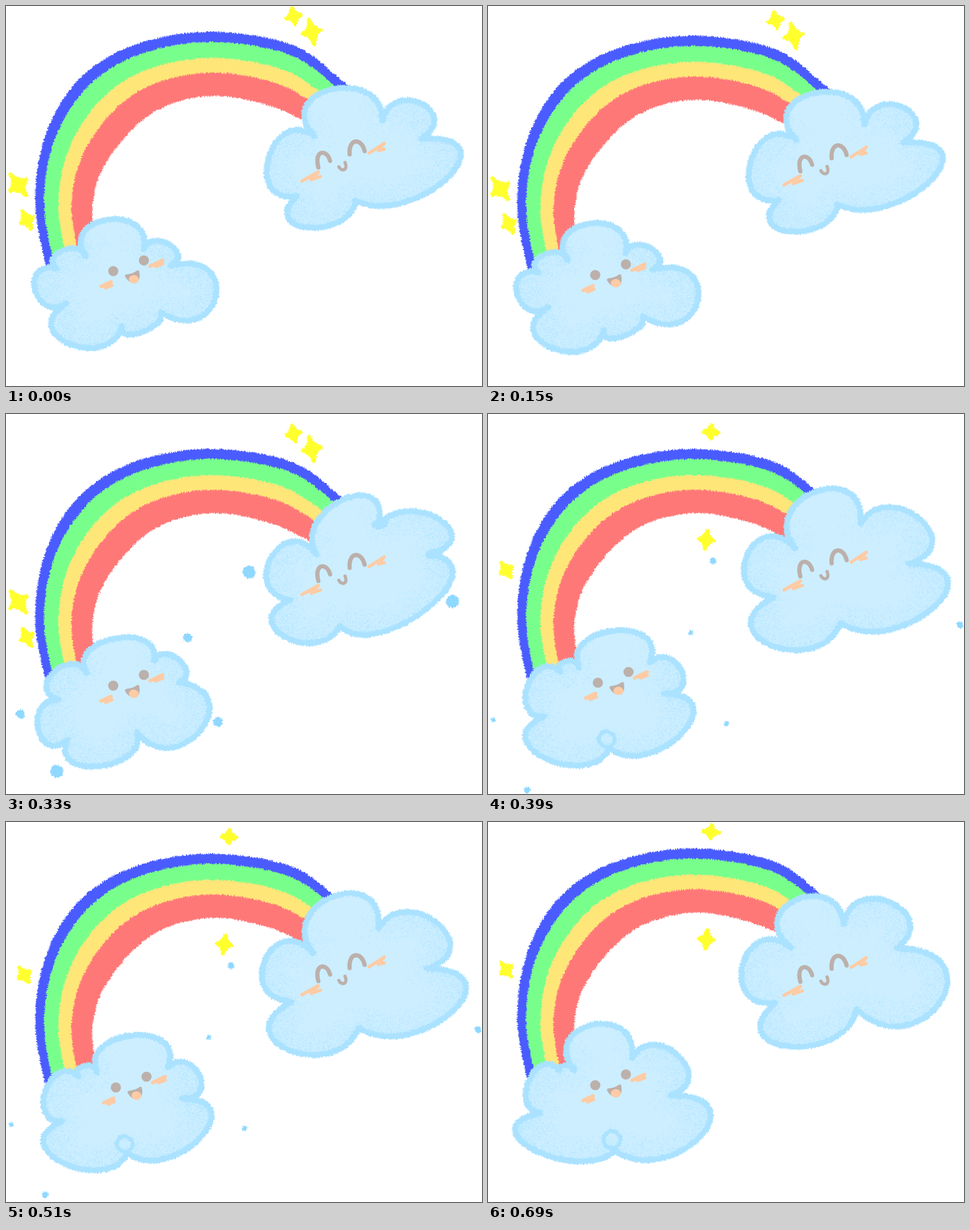
An HTML page with a canvas for the animation above (720 ms loop, 730 by 584 pixels).

```html
<!DOCTYPE html>
<html lang="en">
<head>
<meta charset="utf-8">
<title>Rainbow clouds</title>
<style>
html, body { margin: 0; width: 100%; height: 100%; overflow: hidden; background: #fff; }
canvas { display: block; width: 730px; height: 584px; }
</style>
</head>
<body>
<canvas id="stage" width="730" height="584"></canvas>
<script>
const W = 730, H = 584, LOOP = 720, STEP = 30, SCENE = 90, BOB = 15.5;
const LINE = '#aae2ff', FILL = '#cceeff', SHADE = '#b8e7ff', DROP = '#8fd8ff';
const GREY = '#bcb0ab', PEACH = '#ffcba4', YELLOW = '#ffff2e';

let seed = 7;
function random() {
  seed = (Math.imul(seed, 1664525) + 1013904223) >>> 0;
  return seed / 4294967296;
}

// Bands lie at fixed fractions between the outer and the inner edge
const outer = [[62,398], [46,300], [62,198], [112,114], [195,61], [312,40], [440,60], [520,118], [560,152]];
const inner = [[140,372], [133,310], [150,248], [200,184], [255,150], [326,138], [405,153], [465,180], [490,196]];
const bands = [['#4a5cff', 0, 0.157], ['#78ff8b', 0.157, 0.41], ['#ffe678', 0.41, 0.64], ['#ff7878', 0.64, 1]];

// Lobes run clockwise: end cusp x, y, bulge height, lean along the chord
const poses = [
  {
    lift: 0, face: { x: 0, left: 0, right: 0 },
    right: [[577,176,64,-15], [637,204,49,13], [536,299,71,-75], [446,292,47,30], [473,200,58,-5]],
    left: [[211,374,52,-4], [252,399,27,8], [237,471,78,-7], [178,492,19,8], [93,457,56,24], [78,403,41,6], [122,385,22,-6]]
  },
  {
    lift: 10, face: { x: 0, left: -4, right: -5.5 }, pads: [[574,165], [656,211]], burst: 0,
    right: [[572,167,59,25], [650,212,54,38], [512,322,62,-45], [436,282,54,30], [476,212,58,3]],
    left: [[227,375,44,0], [265,408,26,5], [201,485,73,-18], [95,496,46,14], [81,435,41,-8], [124,394,36,-8]]
  },
  {
    lift: 12, face: { x: 4, left: -8.5, right: -12.5 }, curl: [182,498,12], burst: 1,
    right: [[571,167,71,8], [645,228,64,22], [541,319,76,-70], [438,279,71,40], [472,205,64,2]],
    left: [[248,380,53,8], [270,428,39,6], [187,512,62,-45], [86,463,57,35], [111,394,40,0], [139,388,14,-3]]
  },
  {
    lift: 1, face: { x: 0, left: -4, right: -3.5 }, curl: [190,488,13],
    right: [[546,157,64,-10], [627,194,60,10], [565,288,101,-32], [440,278,65,45], [465,193,64,0]],
    left: [[221,363,63,-5], [280,420,52,10], [195,505,77,-60], [80,447,55,60], [109,382,36,5], [132,382,8,0]]
  }
];

// Drops fly off by dx, dy and shrink: x, y, radius, dx, dy
const drops = [
  [373,229,10,-28,-17], [685,274,10,39,36], [279,330,7,32,-8],
  [22,447,7,-14,9], [325,459,7.5,41,3], [78,535,10,-18,29]
];

// x, y, long and short radius, tilt
const earlyStars = [[441,16,14,13,-0.2], [469,40,21,16,-0.2], [19,275,22,17,-0.62], [32,329,17,12,-0.46]];
const lateStars = [[342,14,12,14,0.08], [335,179,16,13,0.12], [28,226,15,12,-0.58]];

const mix = (a, b, f) => a.map((v, i) => v + (b[i] - v) * f);

function spline(path, points) {
  const at = i => points[Math.max(0, Math.min(points.length - 1, i))];
  for (let i = 0; i < points.length - 1; i++) {
    const [a, b, c, d] = [at(i - 1), at(i), at(i + 1), at(i + 2)];
    path.bezierCurveTo(b[0] + (c[0] - a[0]) / 6, b[1] + (c[1] - a[1]) / 6,
      c[0] - (d[0] - b[0]) / 6, c[1] - (d[1] - b[1]) / 6, ...c);
  }
}

function disc(g, x, y, r, color, ry = r, turn = 0) {
  g.fillStyle = color;
  g.beginPath();
  g.ellipse(x, y, r, ry, turn, 0, Math.PI * 2);
  g.fill();
}

function stroke(g, d, color, width) {
  g.strokeStyle = color;
  g.lineWidth = width;
  g.stroke(new Path2D(d));
}

function drawRainbow(g, shift) {
  const edge = f => outer.map((p, i) => mix(p, inner[i], f));
  g.save();
  g.translate(shift, 0);
  g.lineWidth = 0.6;
  for (const [color, from, to] of bands) {
    const top = edge(from), bottom = edge(to).reverse();
    const band = new Path2D();
    band.moveTo(...top[0]);
    spline(band, top);
    band.lineTo(...bottom[0]);
    spline(band, bottom);
    band.closePath();
    g.fillStyle = g.strokeStyle = color;
    g.fill(band);
    g.stroke(band);
  }
  g.restore();
}

// Turns a lobe into the four points of a cubic curve
function lobeCurve([x, y, height, lean], i, lobes) {
  const [px, py] = lobes[(i || lobes.length) - 1];
  const length = Math.hypot(x - px, y - py);
  const ux = (x - px) / length, uy = (y - py) / length;
  const out = height * 4 / 3, spread = height * 0.55;
  const control = (cx, cy, along) => [cx + uy * out + ux * along, cy - ux * out + uy * along];
  return [[px, py], control(px, py, lean - spread), control(x, y, lean + spread), [x, y]];
}

function pointOn([a, b, c, d], t) {
  const ab = mix(a, b, t), bc = mix(b, c, t), cd = mix(c, d, t);
  return mix(mix(ab, bc, t), mix(bc, cd, t), t);
}

// Specks thin out from the outline inwards; the top lobe stays clear
function speckle(g, curves) {
  g.fillStyle = SHADE;
  for (const curve of curves.slice(1)) {
    const size = Math.hypot(curve[1][0] - curve[2][0], curve[1][1] - curve[2][1]);
    for (let i = size * 24; i > 0; i--) {
      const [x, y] = pointOn(curve, random());
      const angle = random() * Math.PI * 2, reach = 42 * random();
      g.fillRect(Math.round(x + reach * Math.cos(angle)), Math.round(y + reach * Math.sin(angle)), 1, 1);
    }
  }
}

function drawCloud(g, lobes) {
  const curves = lobes.map(lobeCurve);
  const path = new Path2D();
  path.moveTo(...curves[0][0]);
  for (const [, b, c, d] of curves) path.bezierCurveTo(...b, ...c, ...d);
  path.closePath();
  g.fillStyle = FILL;
  g.fill(path);
  g.save();
  g.clip(path);
  speckle(g, curves);
  g.restore();
  g.strokeStyle = LINE;
  g.lineWidth = 9;
  g.stroke(path);
}

function drawPose(g, { lift, right, left, pads = [], curl, burst }) {
  g.save();
  g.translate(0, -lift);
  drawCloud(g, right);
  drawCloud(g, left);
  for (const [x, y] of pads) disc(g, x, y, 13, LINE, 8, -0.2);
  if (curl) {
    g.lineWidth = 6;
    g.beginPath();
    g.arc(...curl, 0, Math.PI * 2);
    g.stroke();
  }
  g.restore();
  if (burst !== undefined) {
    for (const [x, y, r, dx, dy] of drops) disc(g, x + dx * burst, y + dy * burst, r / (1 + burst), DROP);
  }
}

function drawStar(g, [x, y, long, short, tilt]) {
  g.save();
  g.translate(x, y);
  g.rotate(tilt);
  g.beginPath();
  g.moveTo(0, -long + 2);
  for (let i = 1; i <= 4; i++) {
    const r = (i % 2 ? short : long) - 2, a = i * Math.PI / 2, mid = a - Math.PI / 4;
    g.quadraticCurveTo(4 * Math.sin(mid), -4 * Math.cos(mid), r * Math.sin(a), -r * Math.cos(a));
  }
  g.fillStyle = g.strokeStyle = YELLOW;
  g.lineWidth = 6;
  g.fill();
  g.stroke();
  g.restore();
}

// Crayon edge: shift short runs of pixels at random
function roughen(g) {
  const image = g.getImageData(0, 0, W, H);
  const out = new Uint32Array(image.data.buffer), src = out.slice();
  const jitter = n => Array.from({ length: n }, () => Math.round((random() - 0.5) * 2.4));
  const cols = Math.ceil(W / 12), rows = Math.ceil(H / 12);
  const shiftX = jitter(cols * H), shiftY = jitter(rows * W);
  for (let y = 0; y < H; y++) {
    for (let x = 0; x < W; x++) {
      const sx = x + shiftX[y * cols + (x / 12 | 0)];
      const sy = y + shiftY[x * rows + (y / 12 | 0)];
      if (sx >= 0 && sx < W && sy >= 0 && sy < H) out[y * W + x] = src[sy * W + sx];
    }
  }
  g.putImageData(image, 0, 0);
}

function drawFaces(g, { x, left, right }) {
  g.save();
  g.translate(x, left);
  disc(g, 164.5, 407.5, 7.8, GREY);
  disc(g, 211.5, 391, 7.8, GREY);
  g.fillStyle = GREY;
  g.fill(new Path2D('M185 415L202 409L202 419Q196 427 185 415Z'));
  stroke(g, 'M185 415Q195 414 202 409Q204 418 199 423Q190 424 185 415Z', GREY, 5);
  disc(g, 196, 420, 7.5, PEACH, 6.5);
  stroke(g, 'M146 431L161 424L153 433L162 429', PEACH, 5.5);
  stroke(g, 'M221 400L240 391L230 400L240 396', PEACH, 5.5);
  g.restore();

  g.save();
  g.translate(0, right);
  stroke(g, 'M479 248C472 221 492 219 497 238', GREY, 6.5);
  stroke(g, 'M527 228C525 203 545 202 550 223', GREY, 6.5);
  stroke(g, 'M510.5 247C514 255 525 253 520 240.5', GREY, 5);
  stroke(g, 'M454 269L479 255L468 267L482 262', PEACH, 5);
  stroke(g, 'M557 226L580 211L571 222L580 220', PEACH, 5);
  g.restore();
}

// Each pose spans two scenes; the rainbow leans right in every fourth one
function buildScene(index) {
  const layer = document.createElement('canvas');
  layer.width = W;
  layer.height = H;
  const g = layer.getContext('2d', { willReadFrequently: true });
  const pose = poses[index >> 1];
  seed = 7 + (index >> 1);
  g.lineCap = g.lineJoin = 'round';
  g.fillStyle = '#fff';
  g.fillRect(0, 0, W, H);
  drawRainbow(g, index % 4 === 2 ? 2 : -1);
  drawPose(g, pose);
  (index < 4 ? earlyStars : lateStars).forEach(star => drawStar(g, star));
  roughen(g);
  drawFaces(g, pose.face);
  return layer;
}

const scenes = Array.from({ length: LOOP / SCENE }, (_, i) => buildScene(i));
const stage = document.getElementById('stage').getContext('2d');

function render() {
  const now = performance.now() % LOOP;
  const t = Math.floor(now / STEP) * STEP;
  const bob = BOB * (1 - Math.abs(1 - t / (LOOP / 2)));
  stage.fillStyle = '#fff';
  stage.fillRect(0, 0, W, H);
  stage.drawImage(scenes[Math.floor(t / SCENE)], 0, Math.round(bob));
  requestAnimationFrame(render);
}
render();
</script>
</body>
</html>
```
